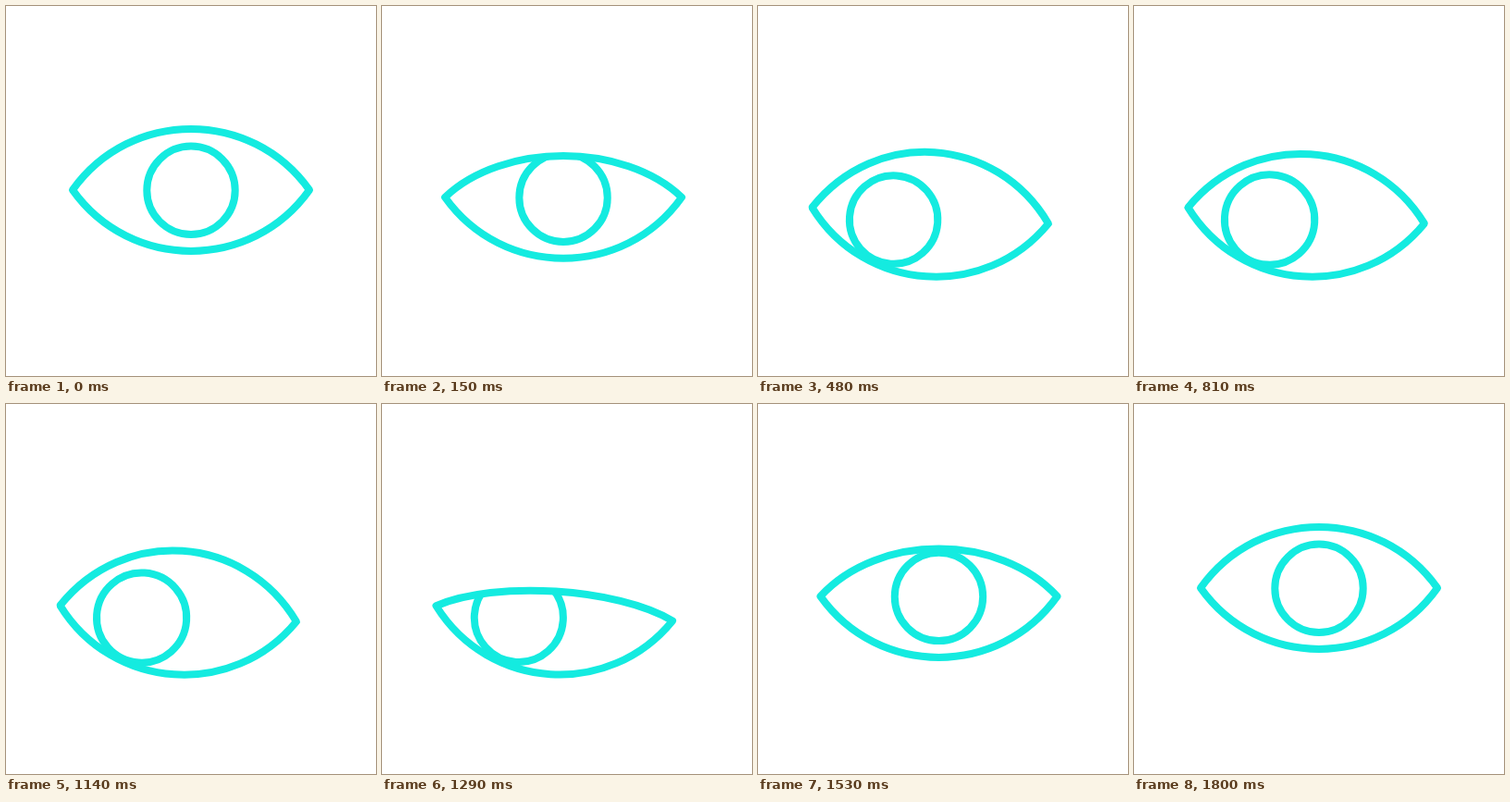
Write an HTML page with a canvas that moves like this. It is 400 by 400 pixels and loops after 3360 ms.

```html
<!DOCTYPE html>
<html lang="en">
<head>
<meta charset="utf-8">
<title>Blinking eye</title>
<style>
  html, body { margin: 0; width: 100%; height: 100%; overflow: hidden; background: #fff; }
  canvas { display: block; }
</style>
</head>
<body>
<canvas id="stage" width="400" height="400"></canvas>
<script>
const LOOP = 3360, STEP = 30;
const HALF_WIDTH = 128, LID_HEIGHT = 66;
const ctx = document.getElementById('stage').getContext('2d');

const sine = u => (1 - Math.cos(Math.PI * u)) / 2;
const cubic = u => u < 0.5 ? 4 * u ** 3 : 1 - 4 * (1 - u) ** 3;
const quadIn = u => u * u;
const quadOut = u => u * (2 - u);

// Each key is [time, value, ease used to reach it].
const tracks = {
  shift: [[0, 0], [75, -0.14, sine], [435, 1, quadOut], [1265, 1, sine],
          [1610, -0.14, quadIn], [1800, 0, sine]],
  tilt: [[150, 0], [450, 1, sine], [1240, 1, sine], [1530, 0, sine]],
  look: [[195, 0], [450, 1, cubic], [1240, 1, sine], [1500, 0, cubic]],
  lid: [[0, 66], [80, 69, sine], [325, -60, sine], [460, 68.5, sine], [860, 66.3, sine],
        [1220, 68, sine], [1395, -60, sine], [1570, 67, sine], [1800, 66, sine]],
  iris: [[450, 47.7], [900, 48.8, sine], [1140, 48.6, sine], [1400, 47.7, sine]]
};

function valueAt(keys, time) {
  const next = keys.findIndex(key => key[0] > time);
  if (next === 0) return keys[0][1];
  if (next < 0) return keys[keys.length - 1][1];
  const [t0, v0] = keys[next - 1], [t1, v1, ease] = keys[next];
  return v0 + (v1 - v0) * ease((time - t0) / (t1 - t0));
}

function eyePath(lid) {
  const path = new Path2D(), bend = 65.4;
  const upper = -lid * 4 / 3, lower = LID_HEIGHT * 4 / 3;
  path.moveTo(-HALF_WIDTH, 0);
  path.bezierCurveTo(-bend, upper, bend, upper, HALF_WIDTH, 0);
  path.bezierCurveTo(bend, lower, -bend, lower, -HALF_WIDTH, 0);
  path.closePath();
  return path;
}

function draw(time) {
  const [shift, tilt, look, lid, iris] =
    ['shift', 'tilt', 'look', 'lid', 'iris'].map(name => valueAt(tracks[name], time));
  const eye = eyePath(lid);

  ctx.fillStyle = '#fff';
  ctx.fillRect(0, 0, 400, 400);
  ctx.strokeStyle = '#14ebe0';
  ctx.lineWidth = 8;
  ctx.lineJoin = 'round';

  ctx.save();
  ctx.translate(200 - 13.8 * shift, 198.9 + 27.6 * shift);
  ctx.rotate(tilt * 3.9 * Math.PI / 180);

  ctx.save();
  ctx.clip(eye);
  ctx.beginPath();
  ctx.arc(-39.2 * look, 0.4 + 6.8 * look, iris, 0, 2 * Math.PI);
  ctx.stroke();
  ctx.restore();

  ctx.stroke(eye);
  ctx.restore();
}

const start = performance.now();
function tick() {
  const time = (performance.now() - start) % LOOP;
  draw(Math.floor(time / STEP) * STEP);
  requestAnimationFrame(tick);
}
tick();
</script>
</body>
</html>
```
